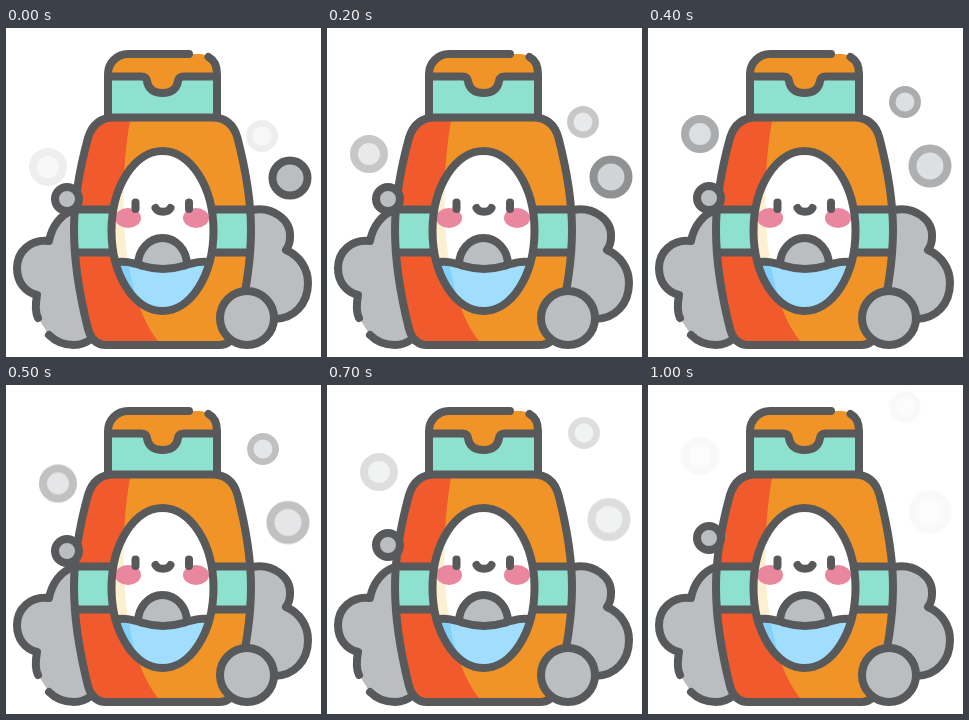
These frames come from a looping animation (315 by 329 pixels, 1.2 s). An HTML page:

```html
<!DOCTYPE html>
<html lang="en">
<head>
<meta charset="utf-8">
<title>Shampoo bottle</title>
<style>
html, body { margin: 0; width: 100%; height: 100%; overflow: hidden; background: #fff; }
svg { display: block; width: 315px; height: 329px; }
.line { fill: none; stroke: #58595b; stroke-width: 8; stroke-linecap: round; stroke-linejoin: round; }
.foam { fill: #bbbdc0; }
.orange { fill: #f19428; }
.red { fill: #f15a2d; }
.mint { fill: #8ee1cf; }
.pink { fill: #e8879d; }

/* The motion ticks every 100 ms: long spans take two steps, short ones hold. */
.bubble { animation: 1200ms infinite steps(2, end); }
.left { animation-name: left; }
.top { animation-name: top; }
.right { animation-name: right; }
.small { animation-name: small; }

@keyframes left {
  0% { transform: translate(42px, 139px); opacity: .1; }
  16.666% { transform: translate(42px, 126px); opacity: .33; animation-timing-function: step-end; }
  25% { transform: translate(42px, 116px); opacity: .44; animation-timing-function: step-end; }
  33.333% { transform: translate(52px, 106px); opacity: .5; }
  50% { transform: translate(52px, 91px); opacity: .25; }
  66.666% { transform: translate(52px, 83px); opacity: .14; }
  83.333%, 100% { transform: translate(52px, 71px); opacity: .03; }
}
@keyframes top {
  0% { transform: translate(256px, 108px); opacity: .1; }
  16.666% { transform: translate(256px, 94px); opacity: .33; animation-timing-function: step-end; }
  25% { transform: translate(256px, 84px); opacity: .42; animation-timing-function: step-end; }
  33.333% { transform: translate(257px, 74px); opacity: .5; }
  50% { transform: translate(257px, 54px); opacity: .25; }
  66.666% { transform: translate(257px, 42px); opacity: .14; }
  83.333%, 100% { transform: translate(257px, 22px); opacity: .03; }
}
@keyframes right {
  0% { transform: translate(284px, 150px); opacity: 1; }
  16.666% { transform: translate(284px, 149px); opacity: .66; animation-timing-function: step-end; }
  25% { transform: translate(284px, 146px); opacity: .59; animation-timing-function: step-end; }
  33.333% { transform: translate(282px, 138px); opacity: .48; }
  50% { transform: translate(282px, 137px); opacity: .27; }
  66.666% { transform: translate(282px, 132px); opacity: .14; }
  83.333%, 100% { transform: translate(282px, 127px); opacity: .03; }
}
@keyframes small {
  0% { transform: translate(61px, 171px); }
  16.666% { transform: translate(61px, 171px); animation-timing-function: step-end; }
  25% { transform: translate(61px, 171px); animation-timing-function: step-end; }
  33.333% { transform: translate(61px, 170px); }
  50% { transform: translate(61px, 162px); }
  66.666% { transform: translate(61px, 158px); }
  83.333%, 100% { transform: translate(61px, 153px); }
}
</style>
</head>
<body>
<svg viewBox="0 0 315 329">
  <defs>
    <path id="body" d="M108 89.500H206C220 89.500 228 97 231.500 110C240 143 245 172 245 202C245 232 240 265 231 301C228 311 223 317 213 317H100C90 317 85 311 82 301C73 265 68 232 68 202C68 172 73 143 82 110C86 97 94 89.500 108 89.500Z"/>
    <ellipse id="egg" cx="156.500" cy="203" rx="51" ry="80"/>
    <path id="shade" d="M124 89V93C112 160 114 265 152 313V320H60V89Z"/>
    <path id="mound" d="M132 237A24.500 27 0 0 1 181 237"/>
    <path id="wave" d="M108 235C118 232 127 235 137 238Q157 244 177 238C187 235 196 232 206 235"/>
    <path id="water" d="M104 235H108C118 232 127 235 137 238Q157 244 177 238C187 235 196 232 206 235H210V290H104Z"/>
    <clipPath id="inBody"><use href="#body"/></clipPath>
    <clipPath id="inEgg"><use href="#egg"/></clipPath>
    <clipPath id="inWater"><use href="#water"/></clipPath>
  </defs>

  <!-- foam -->
  <path class="foam" d="M68 182C55 186 46 198 43 213C24 211 11 224 11 240C11 254 19 264 31 267C29 278 29 284 32 290L43 307C50 314 58 317 68 317C75 317 80 315 85 311L95 182Z"/>
  <path class="line" d="M68 182C55 186 46 198 43 213C24 211 11 224 11 240C11 254 19 264 31 267C29 278 29 284 32 290M43 307C50 314 58 317 68 317C75 317 80 315 85 311"/>
  <path class="foam" d="M230 182H246C267 178 285 192 284 209C284 214 283 218 280 222C294 228 302 241 302 255C302 276 288 291 268 291H230Z"/>
  <path class="line" d="M246 182C267 178 285 192 284 209C284 214 283 218 280 222C294 228 302 241 302 255C302 276 288 291 268 291"/>

  <!-- cap -->
  <path class="mint" d="M102 48H211V90H102Z"/>
  <path class="orange" d="M102 48.500V46A20 20 0 0 1 122 26H194Q211 28 211 46V48.500H178C174 48.500 172.500 50 172 53C171 61 165 65 156.500 65C148 65 142 61 141 53C140.500 50 139 48.500 135 48.500Z"/>
  <path class="line" d="M183 26H122A20 20 0 0 0 102 46V90M202.500 29C208 32 211 38 211 46V90M102 48.500H135C139 48.500 140.500 50 141 53C142 61 148 65 156.500 65C165 65 171 61 172 53C172.500 50 174 48.500 178 48.500H211"/>

  <!-- body -->
  <use href="#body" class="orange"/>
  <g clip-path="url(#inBody)">
    <use href="#shade" class="red"/>
    <path class="mint" d="M60 181.500H107V224.500H60ZM207 181.500H250V224.500H207Z"/>
    <path class="line" d="M68 181.500H108M68 224.500H108M206 181.500H245M206 224.500H245"/>
  </g>
  <use href="#body" class="line"/>

  <!-- window -->
  <use href="#egg" fill="#fff"/>
  <g clip-path="url(#inEgg)">
    <use href="#shade" fill="#fcf0d0"/>
    <use href="#mound" class="foam"/>
    <use href="#mound" class="line"/>
    <use href="#water" fill="#a1defe"/>
    <g clip-path="url(#inWater)"><use href="#shade" fill="#83d0fb"/></g>
    <use href="#wave" class="line"/>
    <ellipse class="pink" cx="122" cy="190" rx="13" ry="10"/>
    <ellipse class="pink" cx="190" cy="190" rx="13" ry="10"/>
  </g>
  <use href="#egg" class="line"/>
  <path class="line" d="M129.500 174.500V181M183 174.500V181M149.500 180C152 185 162 185 164.500 180"/>

  <!-- bubbles -->
  <circle class="line" style="fill:#bbbdc0" cx="241" cy="290" r="27"/>
  <g class="bubble left"><circle class="foam" r="15"/><circle class="line" r="15"/></g>
  <g class="bubble top"><circle class="foam" r="13"/><circle class="line" r="12.700" style="stroke-width:6.500"/></g>
  <g class="bubble right"><circle class="foam" r="18"/><circle class="line" r="17.500"/></g>
  <g class="bubble small"><circle class="foam" r="12"/><circle class="line" r="12"/></g>
</svg>
</body>
</html>
```
